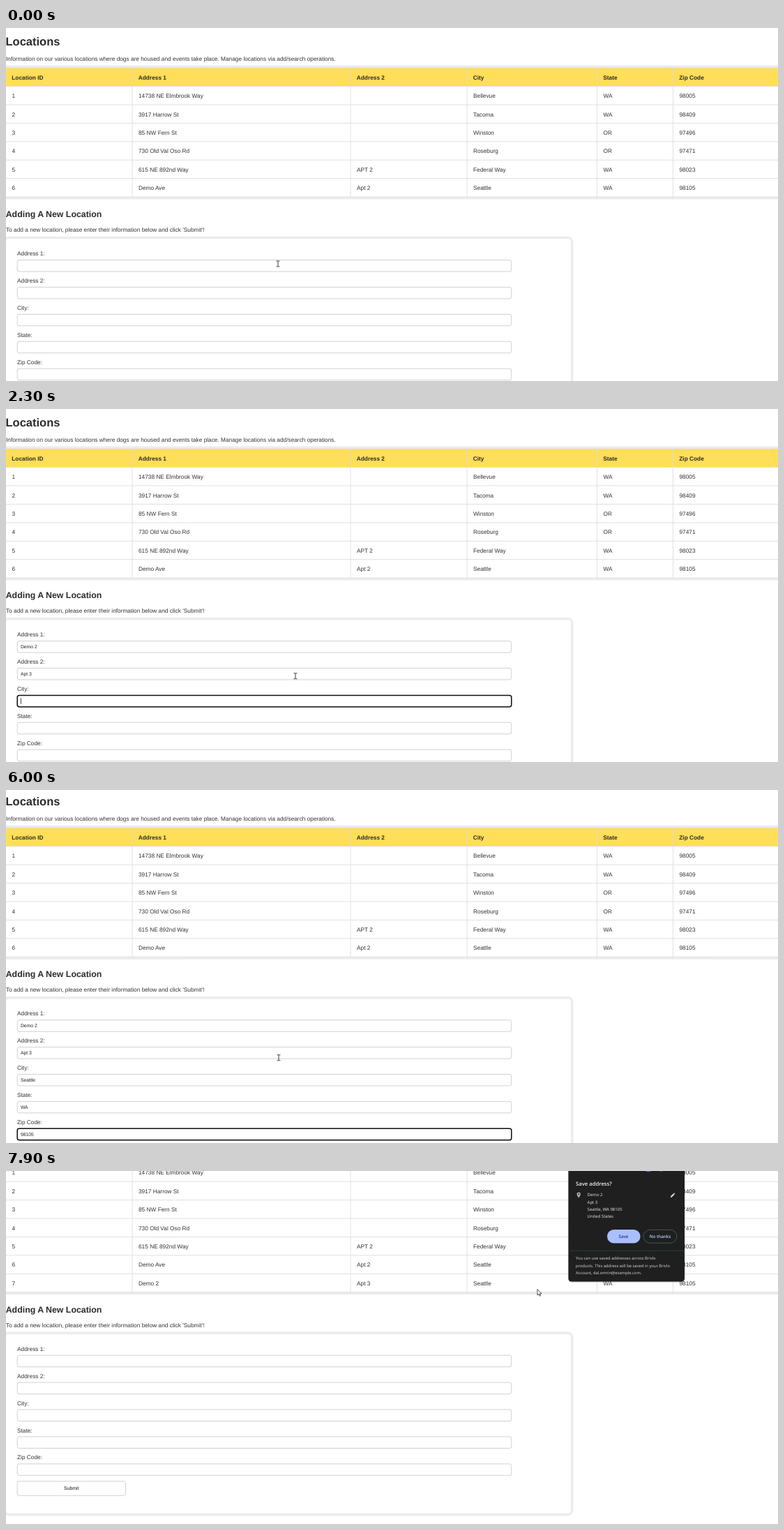
Recreate the animation shown at these times as an HTML page. Size 1107 px wide and 506 px high, loop 8 s.

```html
<!DOCTYPE html>
<html lang="en">
<head>
<meta charset="utf-8">
<title>Locations</title>
<style>
  html, body { margin: 0; width: 100%; height: 100%; overflow: hidden; background: #fff; }
  svg { display: block; width: 1107px; height: 506px; }
  text { font: 8.3px 'Liberation Sans', Arial, sans-serif; fill: #333; white-space: pre; text-rendering: geometricPrecision; }
  .h1 { font-size: 16.5px; font-weight: 700; fill: #2b2b2b; }
  .h2 { font-size: 12.35px; font-weight: 700; fill: #2b2b2b; }
  .th { font-weight: 700; fill: #2b2b2b; }
  .value { font-size: 6.84px; fill: #222; }
  .button { font-size: 6.9px; fill: #111; text-anchor: middle; }
  .ui { font-family: 'Open Sans', 'Noto Sans', sans-serif; font-size: 6px; fill: #eee; }
  .item { font-size: 6.2px; font-weight: 700; }
  .title { font-size: 7.7px; font-weight: 600; fill: #f1f1f1; }
  .note { font-size: 5.84px; fill: #dcdcdc; }
  .pill { font-size: 6.2px; font-weight: 600; text-anchor: middle; }
  .line { fill: none; stroke: #ddd; stroke-width: .9; }
  .box { fill: #fff; stroke: #ccc; stroke-width: .9; }
  .box.focus { stroke: #0c0c0c; stroke-width: 1.5; }
</style>
</head>
<body>
<svg id="stage" viewBox="0 0 1107 506"></svg>
<script>
const LOOP = 8000, STEP = 100, FADE = 155;
const WIDTH = 1107, ROW = 26.42, TABLE_TOP = 57, HEAD_BOTTOM = 83.6;
const FIELD_Y = 340.8, FIELD_GAP = 38.9, TEXT_X = 20.9;
const RELOAD = 6900, SUBMIT = 6800;

const COLUMNS = [0, 181.5, 494.5, 661.5, 848, 957];
const HEADINGS = ['Location ID', 'Address 1', 'Address 2', 'City', 'State', 'Zip Code'];
const LOCATIONS = [
  '14738 NE Elmbrook Way||Bellevue|WA|98005',
  '3917 Harrow St||Tacoma|WA|98409',
  '85 NW Fern St||Winston|OR|97496',
  '730 Old Val Oso Rd||Roseburg|OR|97471',
  '615 NE 892nd Way|APT 2|Federal Way|WA|98023',
  'Demo Ave|Apt 2|Seattle|WA|98105',
  'Demo 2|Apt 3|Seattle|WA|98105'
];
// focus: field selected; from, to: first and last keystroke
const FIELDS = [
  { label: 'Address 1:', text: 'Demo 2', focus: 200, from: 300, to: 900 },
  { label: 'Address 2:', text: 'Apt 3', focus: 1200, from: 1300, to: 2100, hints: ['APT 2', 'Apt 2'] },
  { label: 'City:', text: 'Seattle', focus: 2300, from: 2800, to: 3600, hints: ['Seattle'] },
  { label: 'State:', text: 'WA', focus: 3800, from: 4000, to: 4100 },
  { label: 'Zip Code:', text: '98105', focus: 4300, from: 4700, to: 5500 }
];
const REST = { x: 390, y: 338 };
const MOVES = [
  { from: 800, to: 1000, x: 415, y: 382.7 },
  { from: 5500, to: 5800, x: 391, y: 383.7 },
  { from: 6100, to: 6600, x: 144, y: 377 },
  { from: SUBMIT, to: 7000, x: 178.5, y: 379 },
  { from: 7100, to: 7900, x: 762, y: 169.5 }
];
const CLICKS = [100, 1000, SUBMIT];

const clamp = v => Math.min(1, Math.max(0, v));
const progress = (t, from, to) => clamp((t - from) / (to - from));
const smooth = p => p * p * (3 - 2 * p);
const easeInOut = p => p < .5 ? 4 * p ** 3 : 1 - 4 * (1 - p) ** 3;
const presence = (t, from, to = Infinity) => clamp(Math.min(t - from, to - t) / FADE);

const scrollAt = t => -155.5 * easeInOut(progress(t, 5900, 6500)) + 60.7 * easeInOut(progress(t, 7050, 7650));

function pointerAt(t) {
  let { x, y } = REST;
  for (const move of MOVES) {
    const p = smooth(progress(t, move.from, move.to));
    x += (move.x - x) * p;
    y += (move.y - y) * p;
  }
  return { x, y };
}

// Keystrokes speed up after the first one.
function typed({ text, from, to }, t) {
  const keyTime = i => from + (to - from) * Math.sqrt(i / (text.length - 1));
  return [...text].filter((_, i) => keyTime(i) <= t).join('');
}

const stage = document.getElementById('stage');
function add(parent, tag, attrs = {}) {
  const node = document.createElementNS('http://www.w3.org/2000/svg', tag);
  for (const name in attrs) node.setAttribute(name, attrs[name]);
  return parent.appendChild(node);
}
const group = parent => add(parent, 'g');
const rect = (parent, x, y, width, height, attrs) => add(parent, 'rect', { x, y, width, height, ...attrs });
const path = (parent, d, attrs) => add(parent, 'path', { d, ...attrs });
function write(parent, x, y, string, cls = '') {
  const node = add(parent, 'text', { x, y, class: cls });
  node.textContent = string;
  return node;
}
const place = (node, x, y) => node.setAttribute('transform', `translate(${x} ${y})`);
const show = (node, on) => node.setAttribute('visibility', on ? 'visible' : 'hidden');
function fade(node, opacity, cx, cy) {
  const scale = 1 - .056 * (1 - opacity);
  node.setAttribute('opacity', opacity);
  node.setAttribute('transform', `translate(${cx} ${cy}) scale(${scale}) translate(${-cx} ${-cy})`);
}

const soft = add(add(stage, 'defs'), 'filter', { id: 'soft', x: '-5%', y: '-5%', width: '110%', height: '110%' });
add(soft, 'feGaussianBlur', { stdDeviation: .6 });

function card(parent, y, w, h, r) {
  rect(parent, -3.4, y - 3.4, w + 6.8, h + 6.8, { rx: r + 3.4, fill: '#ececec', filter: 'url(#soft)' });
  rect(parent, 0, y, w, h, { rx: r, fill: '#fff' });
}

const page = group(stage);
write(page, -.5, 25, 'Locations', 'h1');
write(page, 0, 47.2, 'Information on our various locations where dogs are housed and events take place. Manage locations via add/search operations.');

function drawTable(count) {
  const table = group(page), bottom = HEAD_BOTTOM + ROW * count;
  card(table, TABLE_TOP, WIDTH, bottom - TABLE_TOP, 0);
  rect(table, 0, TABLE_TOP, WIDTH, HEAD_BOTTOM - TABLE_TOP, { fill: '#ffde59' });
  path(table, `M0 ${TABLE_TOP}H${WIDTH}`, { class: 'line' });
  for (const x of COLUMNS.slice(1)) path(table, `M${x - .5} ${TABLE_TOP}V${bottom}`, { class: 'line' });
  HEADINGS.forEach((name, c) => write(table, COLUMNS[c] + 8.3, 73.9, name, 'th'));
  for (let r = 0; r <= count; r++) path(table, `M0 ${HEAD_BOTTOM + ROW * r}H${WIDTH}`, { class: 'line' });
  LOCATIONS.slice(0, count).forEach((row, r) => {
    [r + 1, ...row.split('|')].forEach((cell, c) =>
      write(table, COLUMNS[c] + 8.5, HEAD_BOTTOM + ROW * r + 16.6, cell));
  });
  return table;
}
const tableBefore = drawTable(6), tableAfter = drawTable(7);

const lower = group(page);
write(lower, -.3, 271.2, 'Adding A New Location', 'h2');
write(lower, 0, 291.9, "To add a new location, please enter their information below and click 'Submit'!");
card(lower, 302.3, 810, 256.7, 4);

FIELDS.forEach((field, i) => {
  field.y = FIELD_Y + FIELD_GAP * i;
  write(lower, 16, field.y - 14.6, field.label);
  field.box = rect(lower, 16.2, field.y - 8.2, 708.6, 16.5, { rx: 2.8 });
  field.value = write(lower, TEXT_X, field.y + 2.3, '', 'value');
});
const caret = rect(lower, 0, 0, .8, 8.4, { fill: '#111' });

rect(lower, 16.2, 513.2, 155.2, 20.4, { rx: 2.8, class: 'box' });
write(lower, 93.8, 525.8, 'Submit', 'button');
write(lower, -.3, 586.9, 'Search For A Location by City Or State', 'h2');
write(lower, 0, 607.6, 'Search by city or state, partial city or state are OK too!');
card(lower, 618.2, 810, 200, 4);

for (const field of FIELDS.filter(f => f.hints)) {
  const menu = field.menu = group(lower);
  const top = field.y + 14, height = 18.7 * field.hints.length + 3.9;
  field.menuY = top + height / 2;
  rect(menu, 67.5, top, 80.5, height, { rx: 3.2, fill: '#1f1f1f' });
  path(menu, `M73.5 ${top + .5}l4.5 -4.2l4.5 4.2Z`, { fill: '#1f1f1f' });
  field.hints.forEach((hint, i) => write(menu, 73.5, top + 13.7 + 18.7 * i, hint, 'ui item'));
}

// Address prompt
const prompt = group(stage);
rect(prompt, 806, -20, 167.4, 179.6, { rx: 5, fill: '#000', opacity: .25, filter: 'url(#soft)' });
rect(prompt, 806.5, -20, 166.5, 178.6, { rx: 4.5, fill: '#1f1f1f' });
path(prompt, 'M916 -1Q920 1.5 925 0M937 -1L940.5 .8', { stroke: '#8a4fa8', 'stroke-width': 1.3, fill: 'none' });
write(prompt, 817, 21.2, 'Save address?', 'ui title');
path(prompt, 'M821.2 38.4C819.8 36.5 818.5 35 818.5 33.2A2.7 2.7 0 0 1 823.9 33.2C823.9 35 822.6 36.5 821.2 38.4Z', { fill: '#aaa' });
add(prompt, 'circle', { cx: 821.2, cy: 33.2, r: .9, fill: '#1f1f1f' });
['Demo 2', 'Apt 3', 'Seattle, WA 98105', 'United States']
  .forEach((line, i) => write(prompt, 833.6, 36.3 + 10.35 * i, line, 'ui'));
path(prompt, 'M953 37.8v-1.5l4 -4l1.5 1.5l-4 4ZM957.4 31.9l.6 -.6l1.5 1.5l-.6 .6Z', { fill: '#ddd' });
rect(prompt, 862, 84, 47.6, 19.6, { rx: 9.8, fill: '#a9bfff' });
write(prompt, 885.5, 96.2, 'Save', 'ui pill').style.fill = '#1d3479';
rect(prompt, 914.2, 84.3, 47.8, 19, { rx: 9.5, fill: 'none', stroke: '#3f6472', 'stroke-width': .8 });
write(prompt, 938, 96.2, 'No thanks', 'ui pill').style.fill = '#b9cffb';
path(prompt, 'M806.5 114.3H973', { stroke: '#2d4646', 'stroke-width': .7 });
['You can use saved addresses across Brivlo', 'products. This address will be saved in your Brivlo', 'Account, dal.omrin@example.com.']
  .forEach((line, i) => write(prompt, 817, 127.2 + 10.35 * i, line, 'ui note'));

const ripples = CLICKS.map(time => {
  const { x, y } = pointerAt(time);
  return { time, node: add(stage, 'circle', { cx: x, cy: y, r: 18.7, fill: '#ffe94d' }) };
});

const beam = path(stage, 'M-2.4 -4H-.6L0 -3.5L.6 -4H2.4M0 -3.5V3.5M-2.4 4H-.6L0 3.5L.6 4H2.4',
  { fill: 'none', stroke: '#222', 'stroke-width': .9 });
const arrow = path(stage, 'M0 0V8.6L2 6.8L3.3 9.8L4.6 9.2L3.3 6.3H6Z',
  { fill: '#fff', stroke: '#222', 'stroke-width': .8, 'stroke-linejoin': 'round' });

function render(t) {
  const reloaded = t >= RELOAD;
  place(page, 0, scrollAt(t));
  place(lower, 0, reloaded ? ROW : 0);
  show(tableBefore, !reloaded);
  show(tableAfter, reloaded);

  const active = t < SUBMIT && FIELDS.findLast(field => field.focus <= t);
  for (const field of FIELDS) {
    field.value.textContent = reloaded ? '' : typed(field, t);
    field.box.setAttribute('class', field === active ? 'box focus' : 'box');
    if (field.menu) fade(field.menu, presence(t, field.from - STEP, field.to + STEP), 107.8, field.menuY);
  }

  show(caret, active && t < 5800);
  if (active) {
    const width = active.value.textContent ? active.value.getComputedTextLength() : 0;
    place(caret, TEXT_X + width, active.y - 4.2);
  }

  fade(prompt, presence(t, RELOAD), 889.7, 75);
  for (const { time, node } of ripples)
    node.setAttribute('opacity', t < time ? 0 : .55 * (1 - progress(t, time, time + 400) ** 3));

  const { x, y } = pointerAt(t);
  for (const node of [beam, arrow]) place(node, x, y);
  show(beam, t < 6400);
  show(arrow, t >= 6400);
}

const start = performance.now();
function frame() {
  const t = (performance.now() - start) % LOOP;
  render(Math.floor(t / STEP) * STEP);
  requestAnimationFrame(frame);
}
frame();
</script>
</body>
</html>
```
